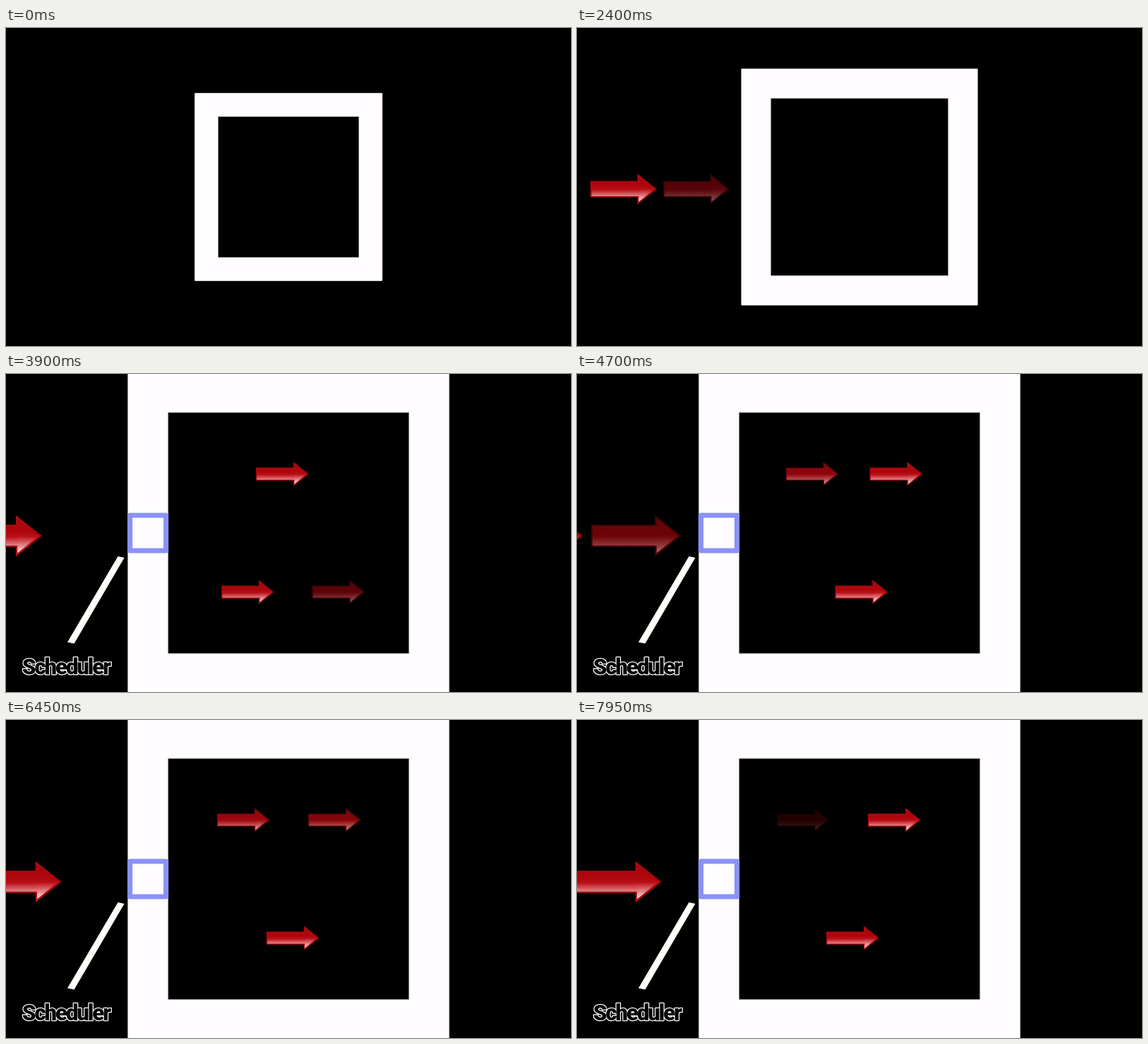
Animation, 800 px wide and 450 px high, one loop 8000 ms. Source, as an HTML page with a canvas:

```html
<!DOCTYPE html>
<html lang="en">
<head>
<meta charset="utf-8">
<title>Scheduler</title>
<style>
  html, body { margin: 0; width: 100%; height: 100%; overflow: hidden; background: #000; }
  canvas { display: block; }
</style>
</head>
<body>
<canvas id="stage" width="800" height="450"></canvas>
<script>
const ctx = document.getElementById('stage').getContext('2d');
const LOOP = 8000, STEP = 50;
const ZOOM = { start: 2035, length: 1000, scale: 1.712 };

// Each lane sends arrows from x = from to x = to, fading at both ends.
const QUEUE = { y: 227.4, from: 20, to: 184, fade: 16, speed: 0.0705,
  births: Array.from({ length: 7 }, (_, i) => 140 + 1160 * i) };
const INNER = { from: 280, to: 442, fade: 28, speed: 0.0755 };
const LANES = [
  { ...INNER, y: 141.6, births: [2920, 4493, 6202, 7911] },
  { ...INNER, y: 308.6, births: [1870, 3569, 5274, 6983] }
];

const clamp = v => Math.max(0, Math.min(1, v));
const ramp = (t, start, end) => clamp((t - start) / (end - start));

function polygon(points) {
  ctx.beginPath();
  points.forEach(([x, y]) => ctx.lineTo(x, y));
  ctx.closePath();
}

function verticalGradient(y0, y1, ...stops) {
  const g = ctx.createLinearGradient(0, y0, 0, y1);
  stops.forEach(([at, color]) => g.addColorStop(at, color));
  return g;
}

function arrowPath(inset) {
  const i = inset, shaft = 9.2 - i, head = 17 - 2.2 * i;
  polygon([[i, -shaft], [53 + i, -shaft], [53 + i, -head], [74.5 - 1.5 * i, 0],
    [53 + i, head], [53 + i, shaft], [i, shaft]]);
}

function drawArrow(x, y, alpha) {
  ctx.save();
  ctx.translate(x, y);
  ctx.globalAlpha *= alpha;
  arrowPath(0);
  ctx.fillStyle = verticalGradient(-17, 17, [0, '#b0131a'], [0.5, '#a90008'], [1, '#b8141a']);
  ctx.fill();
  arrowPath(1.3);
  ctx.fillStyle = verticalGradient(-14, 14, [0, '#a8060d'], [0.4, '#b0060d'], [0.6, '#be1820'], [1, '#c8484c']);
  ctx.fill();
  ctx.clip();
  ctx.fillStyle = verticalGradient(1, 9, [0, 'rgba(255,190,190,0)'], [1, 'rgba(255,205,205,.62)']);
  ctx.fillRect(1, 1, 53, 8);
  polygon([[54, 1], [70, 1], [54, 15]]);
  ctx.fillStyle = verticalGradient(1, 13, [0, 'rgba(255,200,200,.05)'], [1, 'rgba(255,232,232,.85)']);
  ctx.fill();
  ctx.restore();
}

function drawLane(lane, t) {
  for (const birth of lane.births) {
    const x = lane.from + (t - birth) * lane.speed;
    const alpha = clamp(Math.min(x - lane.from, lane.to - x) / lane.fade);
    if (alpha > 0) drawArrow(x, lane.y, alpha);
  }
}

function drawFrame() {
  const outer = 133, inner = 99.5;
  ctx.beginPath();
  ctx.roundRect(400 - outer, 225 - outer, 2 * outer, 2 * outer, 1);
  ctx.rect(400 - inner, 225 - inner, 2 * inner, 2 * inner);
  ctx.fillStyle = '#fffdff';
  ctx.fill('evenodd');
  ctx.lineWidth = 0.7;
  ctx.strokeStyle = 'rgba(125,115,122,.6)';
  ctx.stroke();
}

function drawGate(alpha) {
  ctx.globalAlpha = alpha;
  ctx.lineWidth = 7;
  ctx.strokeStyle = '#8a92f8';
  ctx.strokeRect(175.6, 200, 50.8, 50);
  ctx.globalAlpha = 1;
}

function drawLabel(alpha) {
  ctx.globalAlpha = alpha;
  polygon([[158.5, 258], [167.5, 260], [96.5, 381.5], [87, 379.5]]);
  ctx.fillStyle = '#fffffa';
  ctx.fill();
  ctx.font = '800 31px Roboto, sans-serif';
  ctx.letterSpacing = '-2px';
  ctx.lineJoin = 'round';
  ctx.lineWidth = 2.6;
  ctx.strokeStyle = '#fff';
  ctx.strokeText('Scheduler', 23, 425);
  ctx.fillStyle = '#000';
  ctx.fillText('Scheduler', 23, 425);
  ctx.globalAlpha = 1;
}

function draw(t) {
  ctx.fillStyle = '#000';
  ctx.fillRect(0, 0, 800, 450);

  const scale = 1 + (ZOOM.scale - 1) * clamp((t - ZOOM.start) / ZOOM.length);
  ctx.save();
  ctx.translate(400, 225);
  ctx.scale(scale, scale);
  ctx.translate(-400, -225);
  drawLane(QUEUE, t);
  drawFrame();
  ctx.restore();

  ctx.globalAlpha = ramp(t, 2950, 3250);
  LANES.forEach(lane => drawLane(lane, t));
  drawGate(ramp(t, 3050, 3350));
  drawLabel(ramp(t, 3350, 3700));
}

function tick(now) {
  draw(Math.floor(now % LOOP / STEP) * STEP);
  requestAnimationFrame(tick);
}
requestAnimationFrame(tick);
</script>
</body>
</html>
```
